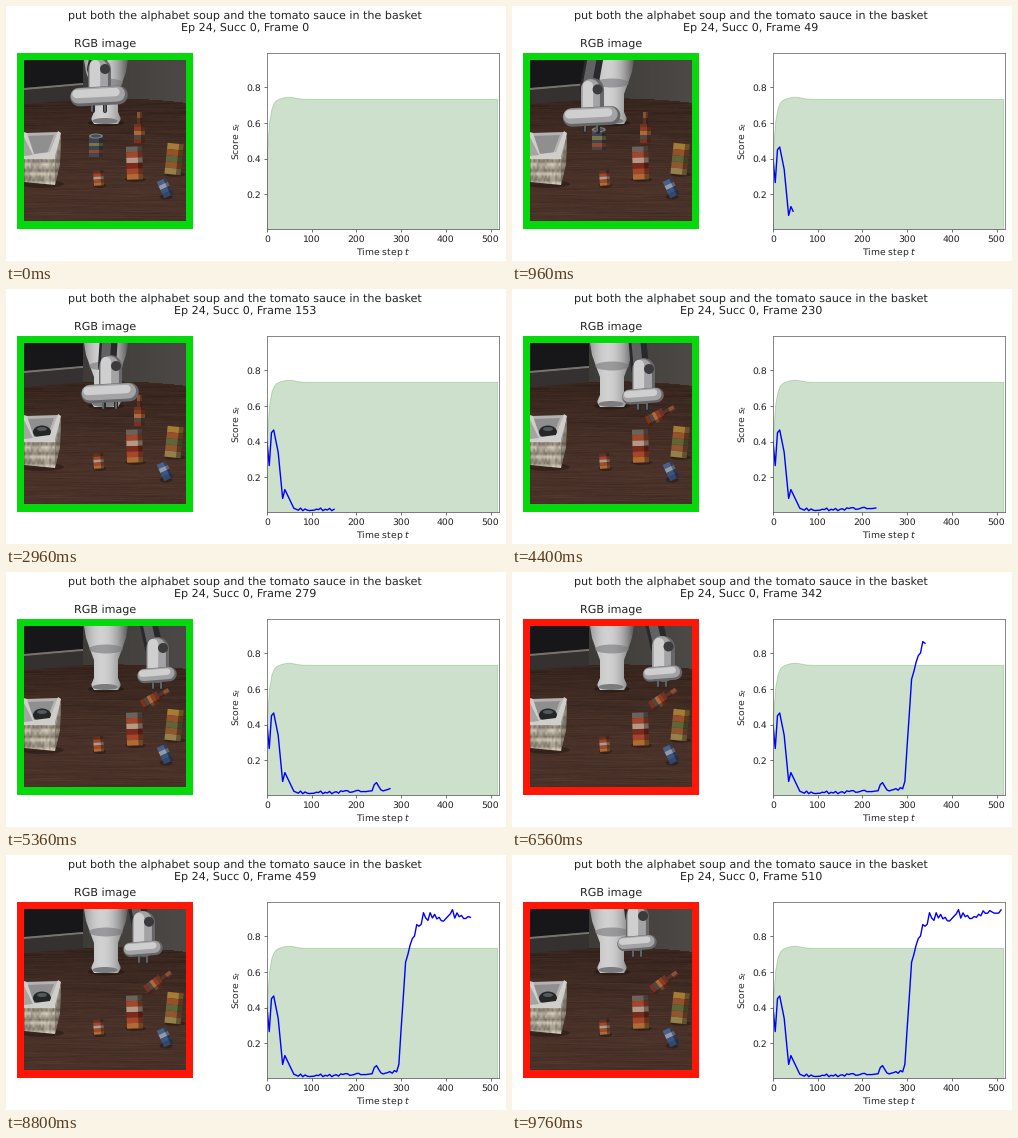
Recreate the animation shown at these times as a matplotlib script. Size 500 by 255 pixels, loop 9.84 s.

```python
import numpy as np
import matplotlib.pyplot as plt
from matplotlib.animation import FuncAnimation
from matplotlib.patches import Circle, Ellipse, Polygon, Rectangle
from matplotlib.path import Path
from matplotlib.transforms import Affine2D

W, H, DPI = 500, 255, 80
FRAMES, INTERVAL = 123, 80
PT = 72 / DPI  # points per pixel
S = 5 / 6      # scale of the default matplotlib sizes
THRESHOLD = 0.735

plt.rcParams.update({
    "font.family": "DejaVu Sans", "font.size": 10 * S, "text.hinting": "none",
    "text.color": "#222222", "axes.labelcolor": "#222222",
    "axes.edgecolor": "#606060", "axes.linewidth": 0.8 * S,
    "axes.labelpad": 3.2 * S,
})
for side in ("xtick", "ytick"):
    plt.rcParams.update({
        f"{side}.color": "#444444", f"{side}.labelcolor": "#222222",
        f"{side}.major.size": 3.5 * S, f"{side}.major.width": 0.8 * S,
        f"{side}.major.pad": 3.1 * S,
    })

rng = np.random.default_rng(4)


def score_curve(x):
    """Early peak, long quiet floor, steep climb to a noisy plateau."""
    keys = [(0, .40), (5, .265), (10, .45), (15, .465), (25, .34), (35, .08),
            (40, .13), (60, .025), (70, .014), (235, .028), (245, .076),
            (255, .03), (290, .04), (295, .08), (310, .64), (320, .75),
            (335, .85), (350, .905), (515, .935)]
    noise = rng.normal(size=x.size)
    noise = np.where(x < 75, 0, np.where(x < 300, .005, .014)) * noise
    return np.maximum(np.interp(x, *zip(*keys)) + noise, .011)


def band_curve(x):
    return (.736 - .286 * np.exp(-x / 6)
            + .012 * np.exp(-((x - 48) / 20) ** 2))


steps = np.arange(0, 520, 5)
score = score_curve(steps)

fig = plt.figure(figsize=(W / DPI, H / DPI), dpi=DPI, facecolor="white")
stage = fig.add_axes([0, 0, 1, 1])
stage.axis("off")

X0, X1, Y0, Y1 = 18.3, 180.4, 54, 215.5
view = Rectangle((X0, Y0), X1 - X0, Y1 - Y0, transform=stage.transData)


def put(artist):
    """Add an artist to the camera picture, cut off at its edges."""
    stage.add_artist(artist)
    artist.set_clip_path(view)
    return artist


def poly(points, color, z=3, **kw):
    return put(Polygon(points, facecolor=color, edgecolor="none", zorder=z, **kw))


def oval(x, y, w, h, color, z=3, **kw):
    return put(Ellipse((x, y), w, h, color=color, lw=0, zorder=z, **kw))


def shadow(x, y, w, h):
    oval(x, y, w, h, "black", 2.5, alpha=0.28)


def textured(points, image, box, z):
    x0, x1, y0, y1 = box
    im = stage.imshow(np.clip(image, 0, 1), extent=(x0, x1, y1, y0),
                      aspect="auto", zorder=z, interpolation="bilinear")
    im.set_clip_path(Path(points + points[:1]), stage.transData)


def block(w, h, bands, z=3, dy=0):
    """A packet around the local origin: stacked colour bands, dark side."""
    def strip(x0, x1, y0, y1, color, **kw):
        return poly([(x0, y0), (x1, y0), (x1, y1), (x0, y1)], color, z, **kw)

    ys = np.linspace(-h / 2, h / 2, len(bands) + 1) + dy
    parts = [strip(-w / 2, w / 2, a, b, c) for a, b, c in zip(ys, ys[1:], bands)]
    parts.append(strip(w * 0.22, w / 2, ys[0], ys[-1], "black", alpha=0.35))
    return parts


def move(parts, x, y, angle=0):
    tr = Affine2D().rotate_deg(angle).translate(x, y) + stage.transData
    for part in parts:
        part.set_transform(tr)


class Limb:
    """A rounded bar shaded by stacked strokes."""
    WHITE = ((1, 0, "#67676a"), (.82, .06, "#a3a3a5"), (.45, .16, "#cfcfd0"))
    DARK = ((1, 0, "#29292b"), (.5, .1, "#626264"))

    def __init__(self, z, layers=WHITE):
        self.layers = layers
        self.lines = [put(plt.Line2D([], [], color=c, zorder=z + i / 100,
                                     solid_capstyle="round"))
                      for i, (_, _, c) in enumerate(layers)]

    def place(self, x0, y0, x1, y1, width):
        for line, (part, shift, _) in zip(self.lines, self.layers):
            d = shift * width
            line.set_data([x0 - d, x1 - d], [y0 - d, y1 - d])
            line.set_linewidth(part * width * PT)


# room and table
n = 162
xx, yy = np.meshgrid(np.linspace(X0, X1, n), np.linspace(Y0, Y1, n))
wall = np.array([76, 73, 70]) / 255 * (0.7 + 0.3 * (xx - X0) / n)[..., None]
edge = 93 + 6 * ((xx - 105) / 87) ** 2
grain = rng.normal(size=(n, n + 40))
grain = np.array([np.convolve(r, np.ones(41) / 41, "valid") for r in grain])
light = 0.76 + 0.26 * np.clip((yy - 92) / 80, 0, 1) + 0.3 * grain
wood = np.array([72, 49, 40]) / 255 * light[..., None]
frame_box = Rectangle((11, 46.6), 176.2, 176.2, lw=0, zorder=0)
stage.add_patch(frame_box)
textured([(X0, Y0), (X1, Y0), (X1, Y1), (X0, Y1)],
         np.where((yy > edge)[..., None], wood, wall), (X0, X1, Y0, Y1), 1)
poly([(18, 54), (77, 54), (77, 77), (18, 82)], "#171719", 1.1)
poly([(18, 82), (77, 77), (77, 79), (18, 84.5)], "#77736f", 1.1)
poly([(18, 84), (77, 79), (77, 93.5), (18, 98)], "#343130", 1.1)

# robot base column, mirrored around its axis
ys = np.linspace(54, 118, 33)
half = np.interp(ys, [54, 66, 80, 88, 106, 113, 118], [22, 20, 15, 12, 12, 15, 12])
column = list(zip(100 - half, ys)) + list(zip(100 + half, ys))[::-1]
u = np.linspace(0, 1, 60)
shade = 0.82 - 1.3 * (u - 0.4) ** 2
shadow(100, 117, 36, 7)
textured(column, shade[None, :, None] * np.ones((40, 1, 3)), (78, 122, 54, 118), 2.6)
oval(100, 77, 34, 9, "#77777a", 2.7, alpha=0.6)
oval(99, 115, 25, 6, "#7c7c7e", 2.7)

# packets on the table: x, y, width, height, lean, bands
ORANGE, RED, CREAM = "#a5462a", "#7c2a1c", "#b39a88"
packets = [
    (128.5, 157, 16, 33, -2, ["#6b625a", ORANGE, CREAM, RED, ORANGE, "#b06a33"]),
    (168, 153, 16, 31, 6, ["#a57c34", "#96502c", "#5d6636", "#8f5630", "#96804a"]),
    (159, 182, 10, 18, -25, ["#4b6088", "#8d9ab0", "#3d5480", "#33486f"]),
    (92.5, 172, 10, 15, -4, ["#5f3226", ORANGE, CREAM, "#a04b2a", "#b06a33"]),
]
for x, y, w, h, lean, bands in packets:
    shadow(x + 1, y + h / 2, w * 1.3, 5)
    move(block(w, h, bands), x, y, lean)

bottle = (block(11, 19, ["#6f3425", "#8a3f25", "#b0683a", "#4c4a42", "#7c3120"], dy=5)
          + block(5, 12, ["#8b5036", "#5b3226"], dy=-10))
can = (block(14, 21, ["#4c4f52", "#3a4650", "#7e7348", "#3a4650", "#94492e",
                      "#44484c"], 3.5)
       + [oval(0, -10, 14, 5, "#7d7f7e", 3.5), oval(0, -10, 10, 3, "#4c4f50", 3.5)])

# basket: lining, wicker, folded front flaps
shadow(36, 178, 44, 8)
poly([(18, 127), (53, 126), (50, 152), (18, 153)], "#b4b3b1", 3.2)
poly([(20, 130), (48, 129), (40, 150), (27, 151)], "#908f90", 3.2)
stored = [oval(36, 143, 18, 13, "#252628", 3.75), oval(36, 140, 10, 4, "#54595b", 3.76)]
rows = 0.12 * np.sin(np.arange(16) * 2.2)[:, None, None]
weave = (0.52 + 0.24 * rng.random((16, 22, 1)) + rows) * np.array([1, .95, .86])
textured([(18.3, 148), (49, 149), (55, 129), (54, 158), (49, 179), (18.3, 176)],
         weave, (18, 55, 128, 179), 3.7)
poly([(18, 126), (21, 127), (28, 148), (44, 146), (52, 125), (55, 127),
      (50, 153), (18, 153)], "#cfcecb", 3.8)
poly([(18, 131), (27, 149), (18, 150)], "#a5a4a2", 3.8)
poly([(49, 150), (55, 129), (54, 158), (49, 179)], "#3d372f", 3.8, alpha=0.35)

# moving arm
fingers = [Limb(4.9, Limb.DARK), Limb(4.9, Limb.DARK)]
upper, lower, hand = Limb(4.8, Limb.DARK), Limb(5.1), Limb(5.3)
joint = put(Circle((0, 0), 5, color="#3b3b3d", lw=0, zorder=5.2))

stage.set_xlim(0, W)
stage.set_ylim(H, 0)


def label(x, y, text):
    return stage.text(x, y, text, fontsize=12 * S, ha="center", va="baseline")


label(239, 13, "put both the alphabet soup and the tomato sauce in the basket")
label(99.5, 41, "RGB image")
caption = label(239, 25, "")

# chart
chart = fig.add_axes([261 / W, 1 - 222.6 / H, 232 / W, 175.8 / H])
chart.fill_between(steps, 0, band_curve(steps), color="darkgreen", alpha=0.2, lw=S)
curve, = chart.plot([], [], color="blue", lw=1.5 * S)
chart.set_xlim(0, 519)
chart.set_ylim(0.006, 0.995)
chart.set_xticks(range(0, 501, 100))
chart.set_yticks([0.2, 0.4, 0.6, 0.8])
chart.set_xlabel("Time step $t$")
chart.set_ylabel("Score $s_t$")


def ease(a, b, t):
    k = np.clip((t - a) / (b - a), 0, 1)
    return k * k * (3 - 2 * k)


def along(keys, t):
    """Position on a path of (time, x, y) keys."""
    times, xs, ys = zip(*keys)
    return np.interp(t, times, xs), np.interp(t, times, ys)


HAND_PATH = [(0, 93, 90), (9, 90, 112), (24, 38, 104), (37, 104, 104),
             (55, 131, 107), (67, 151, 103), (97, 150, 100), (122, 125, 88)]
CAN_PATH = [(10, 90, 140), (15, 82, 124), (20, 42, 120), (24, 28, 131), (28, 34, 148)]
STEP_KEYS = [(0, 0), (24, 99), (37, 153), (55, 230), (67, 279), (97, 405), (122, 510)]


def draw_arm(i):
    x, y = along(HAND_PATH, i)
    w = 39 - 14 * ease(37, 60, i)  # shrinks as the arm reaches back
    thick = 0.3 * w + 7
    elbow = y - 27
    upper.place(100 + 0.8 * (x - 100), 44, x - 3, elbow, 18)
    lower.place(x, elbow, x, y - 4, 23)
    hand.place(x - w / 2, y + 1, x + w / 2, y - 1, thick)
    joint.center = x + 6, elbow
    for finger, side in zip(fingers, (-1, 1)):
        fx = x + side * 0.16 * w
        finger.place(fx, y + 5, fx, y + thick / 2 + 6, 4)


def draw(i):
    step = int(np.interp(i, *zip(*STEP_KEYS)))
    count = step // 5 + 1
    caption.set_text(f"Ep 24, Succ 0, Frame {step}")
    curve.set_data(steps[:count], score[:count])
    alarm = score[count - 1] > THRESHOLD
    frame_box.set_facecolor("#ff1607" if alarm else "#06d90b")

    draw_arm(i)
    move(can, *along(CAN_PATH, i))
    for part in can:
        part.set_visible(i < 28)
    for part in stored:
        part.set_visible(i >= 28)
    fall, slide = ease(46, 52, i), ease(52, 97, i)
    move(bottle, 133 + 15 * fall + 4 * slide, 122 + 4 * fall + slide,
         62 * fall - 8 * slide)
    return []


anim = FuncAnimation(fig, draw, frames=FRAMES, interval=INTERVAL, repeat=True,
                     init_func=lambda: draw(0), blit=False)
plt.show()
```
